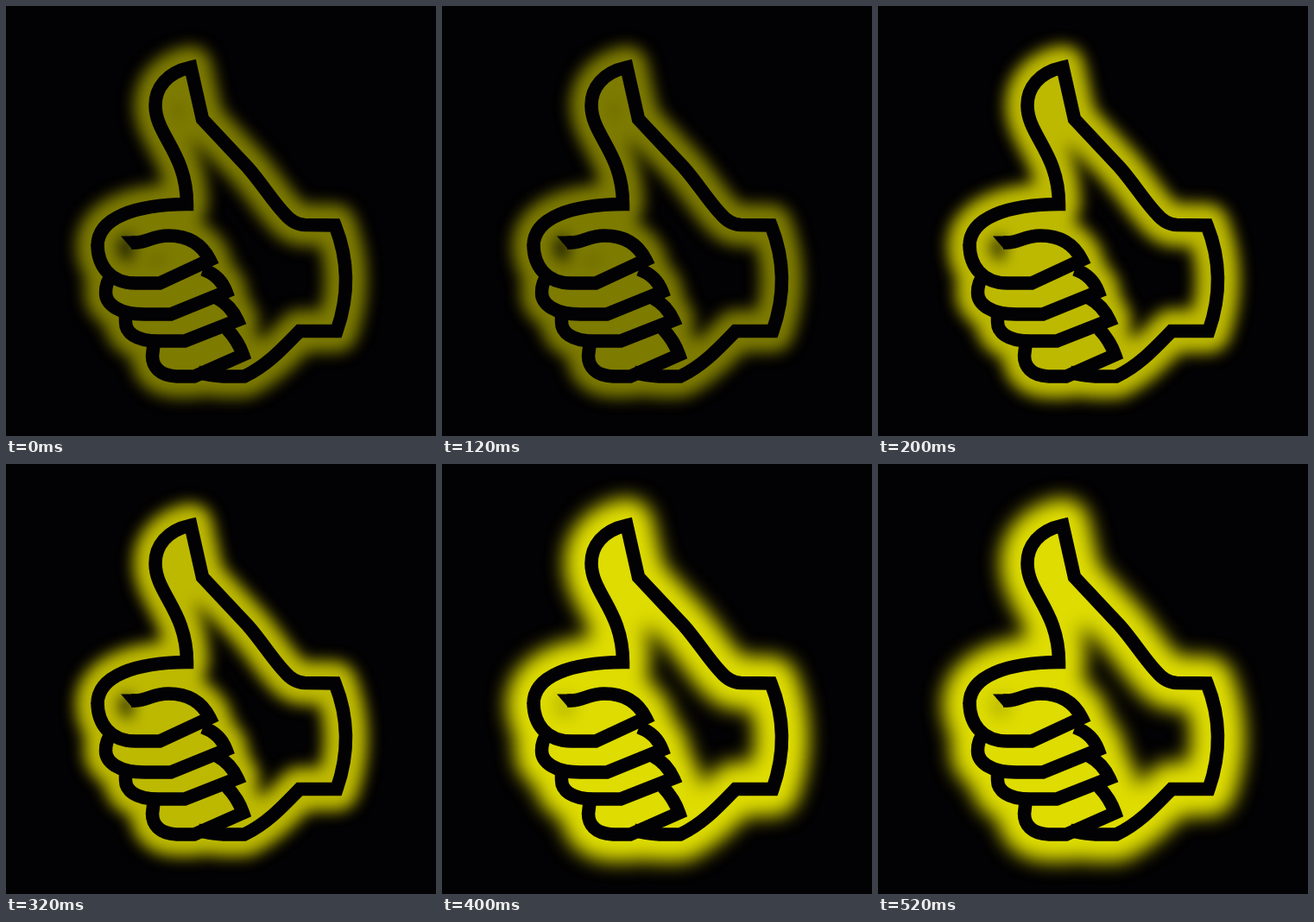
Animation, 498 px wide and 498 px high, one loop 600 ms. Source, as an HTML page:

```html
<!DOCTYPE html>
<html lang="en">
<head>
<meta charset="utf-8">
<title>Glowing thumbs up</title>
<style>
  html, body { margin: 0; width: 100%; height: 100%; overflow: hidden; background: #020103; }
  svg { display: block; width: 100vw; height: 100vh; }
  use { fill: none; }
  #glow { stroke-linejoin: round; }
  #line { stroke: #020103; stroke-width: 15.5; stroke-miterlimit: 8; }
  #nib { fill: #020103; }
</style>
</head>
<body>
<svg viewBox="0 0 498 498">
  <defs>
    <g id="hand">
      <!-- thumb, wrist and palm -->
      <path d="M106 278C106 245 150 230 209.500 229.500C209.500 170 173 150 173 115C173 95 186 77 214 71L227.500 131L280 187C296 205 310 228 323 241Q333 253 346 253.500L381 254Q405 314 383 376.500L340 376.500C322 395 303 416 276 429L252 429Q236 428 222 424"/>
      <!-- fingers, top to bottom -->
      <path d="M106 276C106 300 120 321 150 321L178 321L236 294C226 274 209 266 188 266C170 266 163 274 150 274L145 274"/>
      <path d="M228 305C242 310 251 320 255 331L191 357L160 357C130 357 115.500 345 115.500 332Q115.500 320 122 313"/>
      <path d="M244 338C257 345 264 355 268 364L207 388L176 388C150 388 138.500 378 138.500 366L138.500 356"/>
      <path d="M256 374Q269 388 274.500 404L218 429L198 429C177 428 169.500 417 169.500 405L171 392"/>
    </g>
  </defs>
  <use id="glow" href="#hand"/>
  <use id="line" href="#hand"/>
  <path id="nib" d="M133 266.500H150V281.500H146Z"/>
</svg>
<script>
const glow = document.getElementById('glow');
const STEP = 200;
const levels = [
  { color: '#7d7b00', spread: 17, blur: 8.5 },
  { color: '#bdb900', spread: 18, blur: 8.5 },
  { color: '#dedc00', spread: 24, blur: 11 }
];

function draw(time) {
  const { color, spread, blur } = levels[Math.floor(time / STEP) % levels.length];
  glow.setAttribute('stroke', color);
  glow.setAttribute('stroke-width', 15 + 2 * spread);
  glow.style.filter = `blur(${blur}px)`;
}

const start = performance.now();
function tick() {
  draw(performance.now() - start);
  requestAnimationFrame(tick);
}
tick();
</script>
</body>
</html>
```
